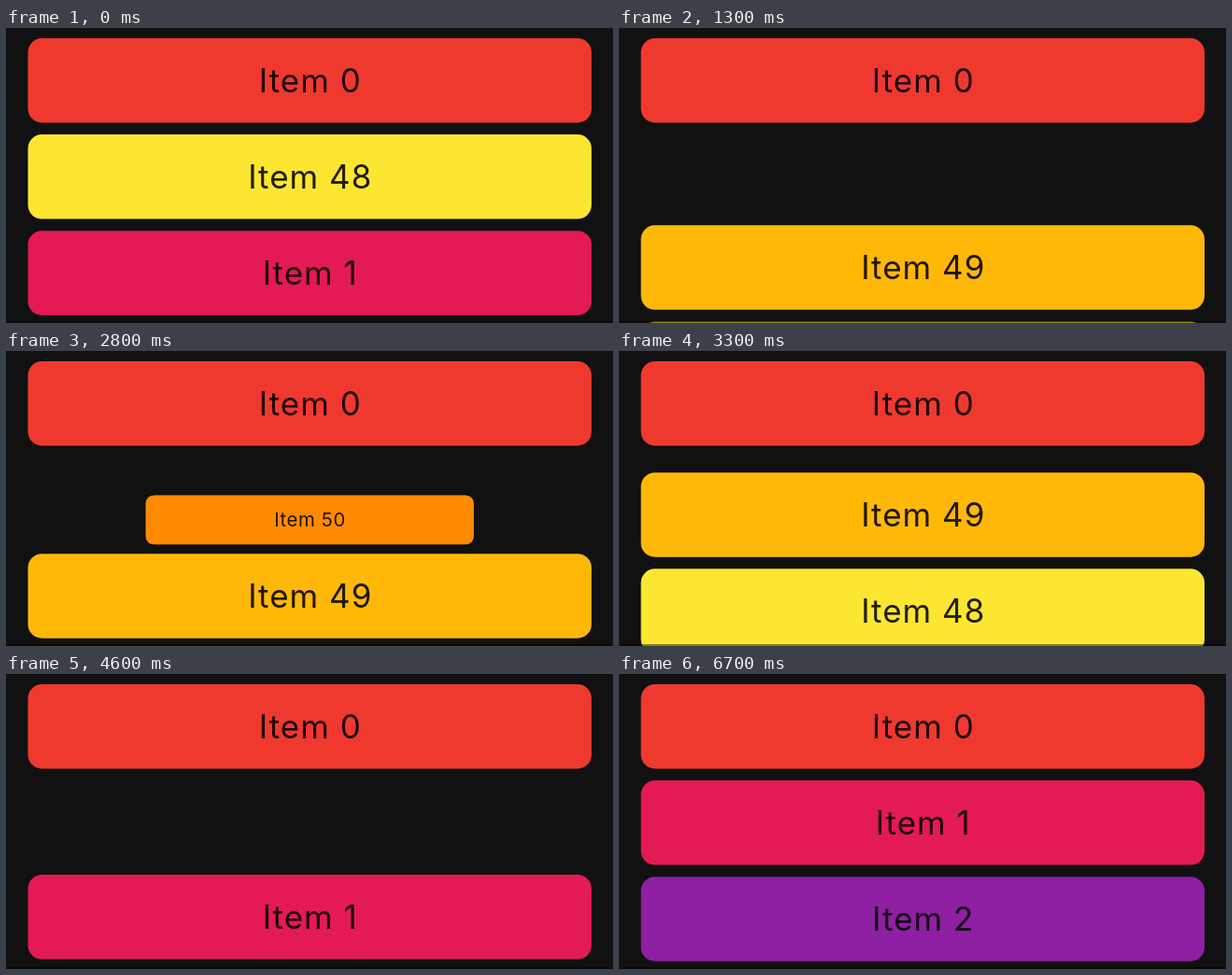
Recreate the animation shown at these times as an HTML page with a canvas. Size 650 by 316 pixels, loop 6800 ms.

```html
<!DOCTYPE html>
<html>
<head>
<meta charset="utf-8">
<style>
html, body { margin: 0; width: 100%; height: 100%; overflow: hidden; background: #111; }
canvas { display: block; }
</style>
</head>
<body>
<canvas id="stage" width="650" height="316"></canvas>
<script>
const ctx = document.getElementById('stage').getContext('2d');
const LOOP = 6800, SIZE_MS = 500, SCALE_MS = 250;
const LEFT = 23.5, TOP = 11, WIDTH = 603.5, HEIGHT = 90.5, PITCH = 103.1, GAP = 6.3;

// add / remove: when an item starts to enter or leave the list
const items = [
  { n: 0, color: '#f0392e' },
  { n: 50, color: '#ff8b03', add: 885, remove: 2688 },
  { n: 49, color: '#ffb808', add: 63, remove: 3500 },
  { n: 48, color: '#fde632', remove: 4300 },
  { n: 1, color: '#e41a55' },
  { n: 2, color: '#8f1fa3' }
];

// cubic-bezier(.42, 0, .58, 1)
function ease(x) {
  if (x <= 0) return 0;
  if (x >= 1) return 1;
  let lo = 0, hi = 1;
  for (let i = 0; i < 20; i++) {
    const u = (lo + hi) / 2, v = 1 - u;
    if (1.26 * v * v * u + 1.74 * v * u * u + u ** 3 < x) lo = u; else hi = u;
  }
  return lo * lo * (3 - 2 * lo);
}

// The slot opens before the card grows; leaving runs the other way round.
function pose({ add = -LOOP, remove = 2 * LOOP }, t) {
  const age = t < remove ? t - add : SIZE_MS + SCALE_MS - (t - remove);
  return { size: ease(age / SIZE_MS), scale: ease((age - SIZE_MS) / SCALE_MS) };
}

function drawCard(item, y, scale) {
  const cx = LEFT + WIDTH / 2;
  ctx.save();
  ctx.translate(cx, y + HEIGHT + GAP);
  ctx.scale(scale, scale);
  ctx.translate(-cx, -HEIGHT - GAP);
  ctx.fillStyle = item.color;
  ctx.beginPath();
  ctx.roundRect(LEFT, 0, WIDTH, HEIGHT, 15);
  ctx.fill();
  ctx.fillStyle = 'rgba(0,0,0,.87)';
  ctx.fillText('Item ' + item.n, cx + 0.5, 58);
  ctx.restore();
}

function draw(now) {
  const t = now % LOOP;
  ctx.fillStyle = '#111';
  ctx.fillRect(0, 0, 650, 316);
  ctx.font = '35px Inter, Roboto, sans-serif';
  ctx.letterSpacing = '1px';
  ctx.textAlign = 'center';
  let y = TOP;
  for (const item of items) {
    const { size, scale } = pose(item, t);
    // a part-open slot has its bottom edge above the next card
    if (scale > 0) drawCard(item, y + (size - 1) * PITCH, scale);
    y += size * PITCH;
  }
  ctx.fillStyle = 'rgba(0,0,0,.45)';
  ctx.fillRect(0, 314, 650, 2);
  requestAnimationFrame(draw);
}
requestAnimationFrame(draw);
</script>
</body>
</html>
```
